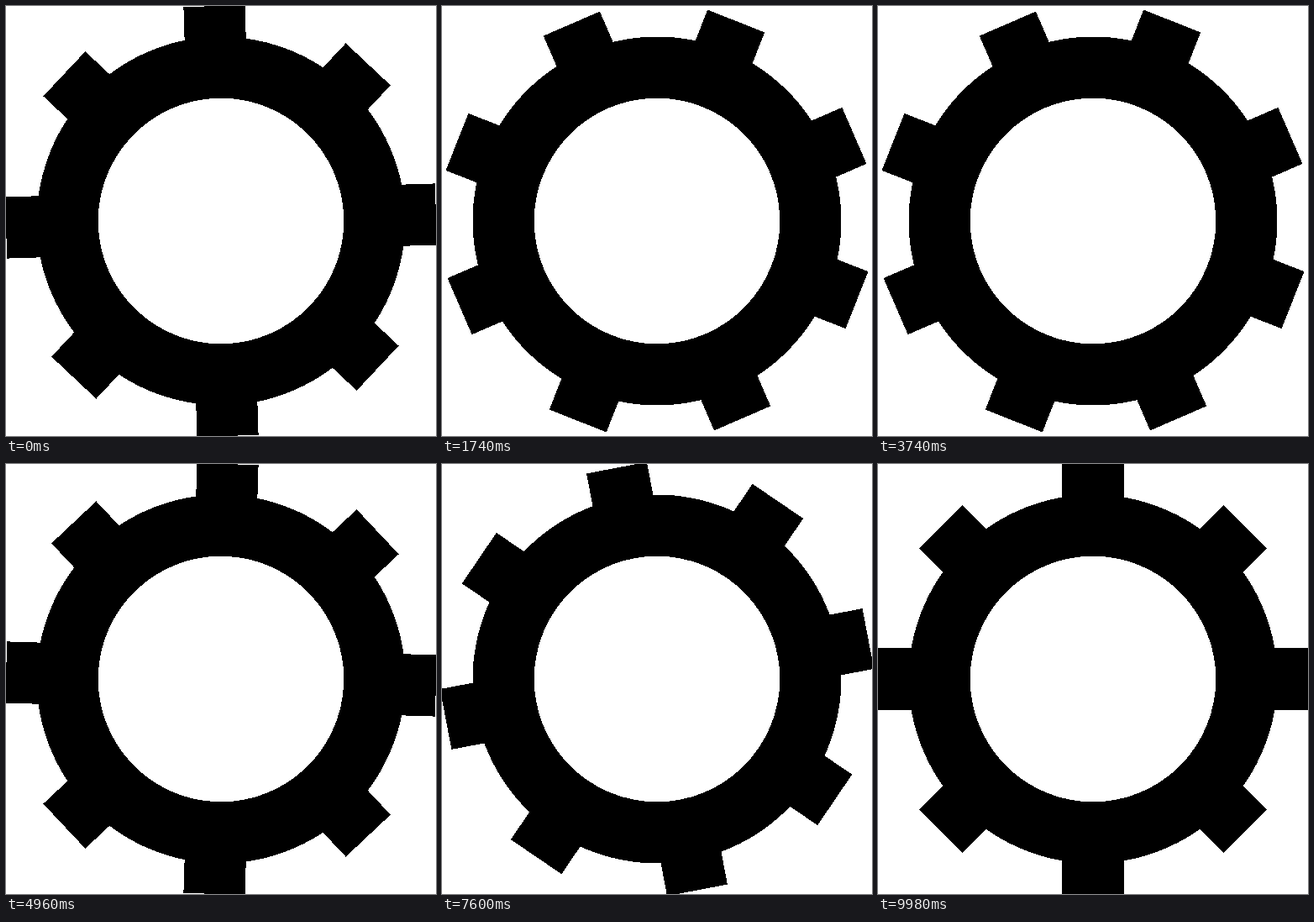
An HTML page that plays this animation: 512 px wide and 512 px high, repeating every 10 s.

```html
<!DOCTYPE html>
<html lang="en">
<head>
<meta charset="utf-8">
<title>Turning gear</title>
<style>
  html, body { margin: 0; width: 100%; height: 100%; overflow: hidden; background: #fff; }
  svg { display: block; width: 100vw; height: 100vh; }
</style>
</head>
<body>
<svg viewBox="-256 -256 512 512" shape-rendering="crispEdges">
  <g id="gear"></g>
</svg>
<script>
const LOOP = 10000;
const STEP_MS = 20;
const STEP_DEG = 1.8;
const TEETH = 8;
const RADIUS = 256;
const UNIT = 512 / 7; // ring thickness and tooth width

const gear = document.getElementById('gear');

function add(tag, attributes) {
  const node = document.createElementNS('http://www.w3.org/2000/svg', tag);
  for (const [key, value] of Object.entries(attributes)) node.setAttribute(key, value);
  gear.append(node);
}

add('circle', { r: 2.5 * UNIT, fill: 'none', stroke: '#000', 'stroke-width': UNIT });
for (let i = 0; i < TEETH; i++) {
  add('rect', {
    x: -UNIT / 2, y: -RADIUS, width: UNIT, height: UNIT,
    transform: `rotate(${i * 360 / TEETH})`
  });
}

function draw() {
  const step = Math.floor((performance.now() % LOOP) / STEP_MS) + 1;
  // The gear looks the same after each tooth pitch.
  const angle = (step * STEP_DEG) % (360 / TEETH);
  gear.setAttribute('transform', `rotate(${-angle.toFixed(3)})`);
  requestAnimationFrame(draw);
}
draw();
</script>
</body>
</html>
```
